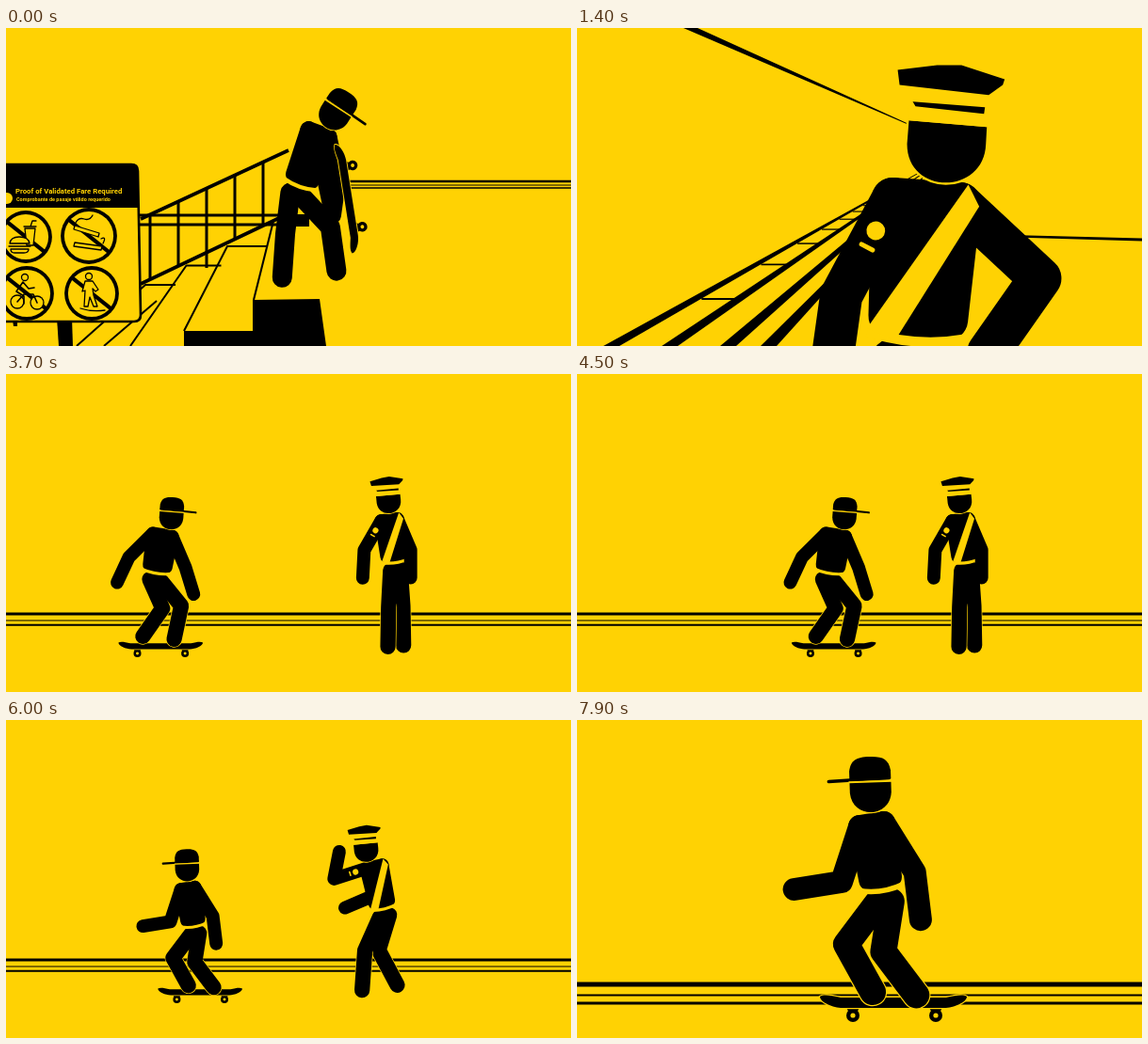
Animation of 600x338 px, one loop 8 s. Source, as an HTML page with a canvas:

```html
<!DOCTYPE html>
<html lang="en">
<head>
<meta charset="utf-8">
<title>Fare rules</title>
<style>
html, body { margin: 0; width: 100%; height: 100%; overflow: hidden; background: #ffd203; }
canvas { display: block; width: 600px; height: 338px; }
</style>
</head>
<body>
<canvas id="stage"></canvas>
<script>
const INK = '#000', SUN = '#ffd203', LOOP = 8000, RAD = Math.PI / 180;
const canvas = document.getElementById('stage');
const ctx = canvas.getContext('2d');
const ratio = window.devicePixelRatio || 1;
canvas.width = 600 * ratio;
canvas.height = 338 * ratio;

// Timing and interpolation
function ramp(t, from, to) {
  return Math.min(1, Math.max(0, (t - from) / (to - from)));
}
function ease(t, from, to) {
  const k = ramp(t, from, to);
  return k * k * (3 - 2 * k);
}
function mix(a, b, k) {
  if (typeof a === 'number') return a + (b - a) * k;
  const out = Array.isArray(a) ? [] : {};
  for (const key in a) out[key] = mix(a[key], b[key], k);
  return out;
}

// Drawing helpers
function trace(p) {
  ctx.beginPath();
  for (let i = 0; i < p.length; i += 2) ctx.lineTo(p[i], p[i + 1]);
}
function shape(p, color = INK) {
  trace(p);
  ctx.closePath();
  ctx.fillStyle = color;
  ctx.fill();
}
function line(p, w, color = INK, cap = 'butt') {
  ctx.lineCap = cap;
  ctx.lineJoin = 'round';
  trace(p);
  ctx.lineWidth = w;
  ctx.strokeStyle = color;
  ctx.stroke();
}
function limb(p, w, color) { line(p, w, color, 'round'); }
function dot(x, y, r, color = INK) {
  ctx.beginPath();
  ctx.arc(x, y, r, 0, 7);
  ctx.fillStyle = color;
  ctx.fill();
}
function ring(x, y, r, w) {
  dot(x, y, r + w / 2);
  dot(x, y, r - w / 2, SUN);
}
function path(d, fill, w, edge = INK) {
  const outline = new Path2D(d);
  ctx.lineWidth = w;
  ctx.strokeStyle = edge;
  ctx.fillStyle = fill;
  if (fill === INK) {
    if (w) ctx.stroke(outline);
    ctx.fill(outline);
  } else {
    if (fill) ctx.fill(outline);
    ctx.stroke(outline);
  }
}
function placed(x, y, s, deg, draw) {
  ctx.save();
  ctx.translate(x, y);
  ctx.rotate(deg * RAD);
  ctx.scale(s, s);
  draw();
  ctx.restore();
}

// Angles are degrees from straight down, positive to the right
function reach(x, y, deg, len) {
  return [x + Math.sin(deg * RAD) * len, y + Math.cos(deg * RAD) * len];
}
function chain(x, y, [first, second], turn, a, b) {
  const joint = reach(x, y, first - turn, a);
  return [x, y, ...joint, ...reach(...joint, second - turn, b)];
}

function capHead({ side, lift }) {
  ctx.save();
  ctx.scale(1, 2 - lift);
  path('M-22 1 H22 V13 C20 41 -20 41 -22 13Z', INK, 2.5, SUN);
  ctx.restore();
  ctx.save();
  ctx.scale(1, lift);
  path('M-22 -1 V-10 C-20 -22 -14 -25 0 -25 S20 -22 22 -10 V-1Z', INK, 0);
  ctx.restore();
  if (Math.abs(side) > 0.2) limb([-20 * side, -2, 44 * side, 0], 3.6);
  line([-23, 1.5, 23, 1.5], 2, SUN);
}
function officerHead() {
  path('M-40 0 L43 7 L42 25 C40 80 -42 80 -42 25Z', INK, 5, SUN);
  shape([-41, -16, 45, -8, 43, 7, -40, 0], SUN);
  shape([-52, -54, -10, -59, 16, -59, 62, -44, 60, -38, 45, -27, -50, -38]);
  shape([-36, -20, 41, -14, 40, -7, -33, -15]);
}
function board([x, y, deg], s) {
  placed(x, y, s, deg, () => {
    for (const wx of [-43, 45]) {
      shape([wx - 8, 4, wx + 8, 4, wx + 3, 13, wx - 3, 13]);
      dot(wx, 14, 7);
      dot(wx, 14, 2.6, SUN);
    }
    path('M-78 -6 C-74 -9 -66 -7 -56 -5 H56 C66 -7 74 -9 78 -6 C78 0 64 6 54 6 H-54 C-64 6 -78 0 -78 -6Z', INK, 2.5, SUN);
  });
}

// One jointed figure for everybody; x, y is the middle of the shoulders
const TRUNK = 58, NECK = 47, UPPER = 62, FORE = 51, THIGH = 54, SHIN = 58;
function body(x, y, lean, neck, tilt, armA, armB, legA, legB, more) {
  return { x, y, lean, neck, tilt, armA, armB, legA, legB,
    broad: 18, trunk: 1, leg: 1, side: 1, lift: 1, ...more };
}
function figure(p, s, officer) {
  placed(p.x, p.y, s, -p.lean, () => {
    const b = p.broad, w = b * 0.85, end = TRUNK * p.trunk;
    const arm = (x, bend) => chain(x, 0, bend, p.lean, UPPER, FORE);
    const leg = (x, bend) => chain(x, end + 26, bend, p.lean, THIGH * p.leg, SHIN * p.leg);
    const left = arm(-b, p.armA);

    for (const l of [leg(b * 0.6, p.legB), leg(-b * 0.6, p.legA)]) {
      limb(l.slice(2), 30.4, SUN);
      limb(l, 28);
    }
    limb([-b * 0.6, end + 26, b * 0.6, end + 26], 24);
    const trunk = [-b, 0, b, 0, w, end, -w, end];
    shape(trunk);
    limb([...trunk, -b, 0], 24);
    ctx.lineCap = 'butt';
    path(`M${-w - 12} ${end + 10} Q0 ${end + 17} ${w + 12} ${end + 10}`, '', 5.5, SUN);
    limb(arm(b, p.armB), 24);
    if (officer) shape([b + 4, -11, b + 11, 1, -b * 0.65, end + 14, -b * 1.5, end + 8], SUN);
    limb(left, 24);
    if (officer) {
      placed(-b, 0, 1, p.lean - p.armA[0], () => {
        dot(0, UPPER * 0.33, 5.3, SUN);
        limb([-3.5, UPPER * 0.5, 3.5, UPPER * 0.5], 2.7, SUN);
      });
    }
    const top = reach(0, 0, 180 - p.neck - p.lean, NECK);
    placed(...top, officer ? 0.53 : 1, p.tilt + p.lean, () => officer ? officerHead() : capHead(p));
  });
}

// Key poses
const carry = body(332, 112, -20, 38, 33, [20, 12], [12, -8], [-7, -4], [43, 8],
  { broad: 15, trunk: 1.15, leg: 1.08 });
const stride = { ...carry, legA: carry.legB, legB: carry.legA };
const ride = body(166, 171, -9, 21, 4, [-45, -25], [23, 17], [24, -35], [39, -12], { leg: 1.08 });
const scolded = body(292, 197, -3, 17, 10, [-26, -48], [13, 7], [-26, -15], [35, 8],
  { leg: 0.8, side: 0, lift: 1.4 });
const push = body(308, 122, 4, -6, -4, [-21, -85], [16, -21], [-39, 8], [-47, 28],
  { broad: 11, side: -1 });
const glide = body(313, 111, 9, -2, -2, [-18, -81], [32, 7], [-37, 29], [-9, 37],
  { broad: 13, side: -1 });
const leave = { ...glide, x: 277, y: 179 };

const tall = { broad: 15, trunk: 1.14, leg: 1.25 };
const watch = body(407, 155, 7, -4, -10, [-30, -3], [23, 0], [-3, -1], [4, 1], tall);
const point = body(391, 156, 12, -21, -10, [-72, -191], [-20, -67], [-24, -4], [-17, 28], tall);
const near = { ...tall, broad: 19 };
const upright = body(371, 184, -4, 14, 0, [-28, -8], [47, -35], [0, 0], [0, 0], near);
const lean = body(307, 225, 14, -28, -33, [-60, 10], [66, -14], [0, 0], [0, 0], near);
const halt = { ...mix(upright, lean, 0.6), armA: [-115, 176] };

// Fare sign
function noSign(x, y, r, icon) {
  ring(x, y, r, 3.8);
  line([x - r * 0.75, y - r * 0.6, x + r * 0.75, y + r * 0.6], 4.2);
  ctx.save();
  ctx.translate(x, y);
  ctx.lineCap = ctx.lineJoin = 'round';
  icon();
  ctx.restore();
}
function meal() {
  path('M-1 -9 H10 L8 9 H1Z M-2 -11 H11 M5 -11 L7 -17 H11', SUN, 1.3);
  path('M-17 7 Q-16 0 -7 0 Q3 0 4 7Z M-18 10 H5 M-16 13 H3 Q3 17 -2 17 H-12 Q-16 17 -16 13', SUN, 1.3);
}
function smokes() {
  path('M-15 -11 L11 -3 L10 1 L-16 -7Z M-15 7 L14 11 L13 15 L-16 11Z', SUN, 1.3);
  path('M-14 -14 Q-11 -20 -5 -18 T4 -22 M13 3 Q19 0 15 8', '', 1.3);
}
function wheels() {
  ring(-10, 9, 7, 1.3);
  ring(11, 10, 7, 1.3);
  ring(-2, -17, 3.5, 1.3);
  path('M-4 -12 L-11 -2 L-3 3 V11 M-4 -12 L2 -5 L8 -6 M-10 9 L-3 1 H7 L11 10', '', 1.6);
}
function rider() {
  ring(-3, -18, 3.5, 1.3);
  path('M-7 -13 H1 L7 -4 L4 -2 L1 -5 L2 2 L6 14 H2 L-2 4 L-4 14 H-8 L-7 -3 L-10 -2Z M-12 16 Q0 20 14 18', SUN, 1.3);
}
function sign() {
  shape([54, 308, 70, 308, 71, 338, 56, 338]);
  shape([7, 310, 12, 310, 12, 317, 8, 317]);
  path('M-20 145 H133 Q140 145 140 152 L143 305 Q143 312 136 312 H-20Z', SUN, 2.6);
  path('M-20 145 H133 Q140 145 140 152 L141 191 H-20Z', INK, 0);
  dot(1, 181, 6, SUN);
  ctx.fillStyle = SUN;
  ctx.font = 'bold 7.75px Roboto, sans-serif';
  ctx.fillText('Proof of Validated Fare Required', 10, 176);
  ctx.font = 'bold 5.5px Roboto, sans-serif';
  ctx.fillText('Comprobante de pasaje válido requerido', 11, 184);
  noSign(21, 222, 26, meal);
  noSign(88, 221, 28, smokes);
  noSign(22, 282, 27, wheels);
  noSign(91, 282, 27, rider);
}

// Scenes
function stairs(t) {
  ctx.save();
  ctx.translate(-110 * t * t / 1e6, 0);
  line([335, 163, 760, 163], 2.6);
  line([335, 167, 760, 167], 1);
  line([335, 170, 760, 170], 1.3);
  line([142, 199, 300, 199], 3);
  line([142, 209, 300, 209], 3);
  shape([296, 198, 322, 198, 322, 211, 296, 211]);
  line([300, 130, 143, 203], 3.6);
  line([290, 202, 143, 272], 3.6);
  for (let x = 153; x < 280; x += 30)
    line([x, 130 + (300 - x) * 0.465, x, x === 213 ? 255 : 202 + (290 - x) * 0.476], 3);
  line([284, 205, 263, 289], 2);
  for (let i = 0; i < 3; i++) {
    const x = 235 - 43.5 * i, y = 232 + 20.5 * i;
    line([x + 42 - 5 * i, y, x, y, 189 - 57 * i, Math.min(338, 322 + 16 * i)], 2);
  }
  line([160, 290, 104, 338], 2);
  shape([262, 289, 333, 288, 340, 338, 189, 338, 189, 322, 262, 322]);
  sign();
  ctx.restore();
  figure(mix(carry, stride, (1 - Math.cos(t / 1000 * Math.PI * 2)) / 2), 0.75);
  board([363, 181, -99], 0.75);
}

function platform(t) {
  shape([113, 0, 128, 0, 392, 120]);
  shape([380, 218, 600, 223.5, 600, 226.5, 380, 220]);
  for (let x = 28; x < 160; x += 62) shape([x, 338, x + 17, 338, 393, 137]);
  shape([195, 338, 212, 338, 304, 236, 298, 236]);
  for (let n = 0; n < 14; n++) {
    const gap = 151 / (1 + 0.32 * n), up = 201 - gap;
    line([46 + up * 1.726, 137 + gap, 92 + up * 1.507, 137 + gap], 0.5 + gap / 95);
  }
  const pose = t < 2800
    ? mix(upright, lean, ease(t, 2250, 2800))
    : mix(lean, halt, ease(t, 2850, 3350));
  pose.x += 26 * (ease(t, 1600, 2100) - ease(t, 2250, 2700));
  figure(pose, 1.88, true);
}

function meeting(t) {
  line([0, 255, 600, 255], 3);
  line([0, 262, 600, 262], 1.2);
  line([0, 266.7, 600, 266.7], 2);
  const stop = ease(t, 4550, 5200), turn = ease(t, 5500, 5800);
  figure(mix(watch, point, stop), 0.58, true);

  const roll = ramp(t, 3700, 4600), dx = 110 * roll * (2 - roll);
  const pose = mix(mix({ ...ride, x: ride.x + dx }, scolded, stop), leave, turn);
  const deck = mix(mix([164 + dx, 289, 0], [270, 260, -90], stop), [290, 289, 0], turn);
  const away = ramp(t, 5750, 6350);
  ctx.save();
  ctx.translate(-245 * away * Math.min(1, 0.4 + away), 0);
  board(deck, 0.575);
  figure(pose, 0.58);
  ctx.restore();
}

function cruise(t) {
  line([0, 281, 600, 281], 5);
  line([0, 292.5, 600, 292.5], 1.8);
  line([0, 301, 600, 301], 3);
  const k = t < 6800
    ? 0.2 * (1 - ease(t, 6400, 6800))
    : 0.2 * ease(t, 6800, 7200) + 0.8 * ease(t, 7150, 7900);
  board([336, 300, 0], 1);
  figure(mix(push, glide, k), 1);
}

function render(t) {
  ctx.setTransform(ratio, 0, 0, ratio, 0, 0);
  ctx.fillStyle = SUN;
  ctx.fillRect(0, 0, 600, 338);
  if (t < 1000) stairs(t);
  else if (t < 3700) platform(t);
  else if (t < 6400) meeting(t);
  else cruise(t);
}

const start = performance.now();
function frame() {
  render((performance.now() - start) % LOOP);
  requestAnimationFrame(frame);
}
frame();
</script>
</body>
</html>
```
